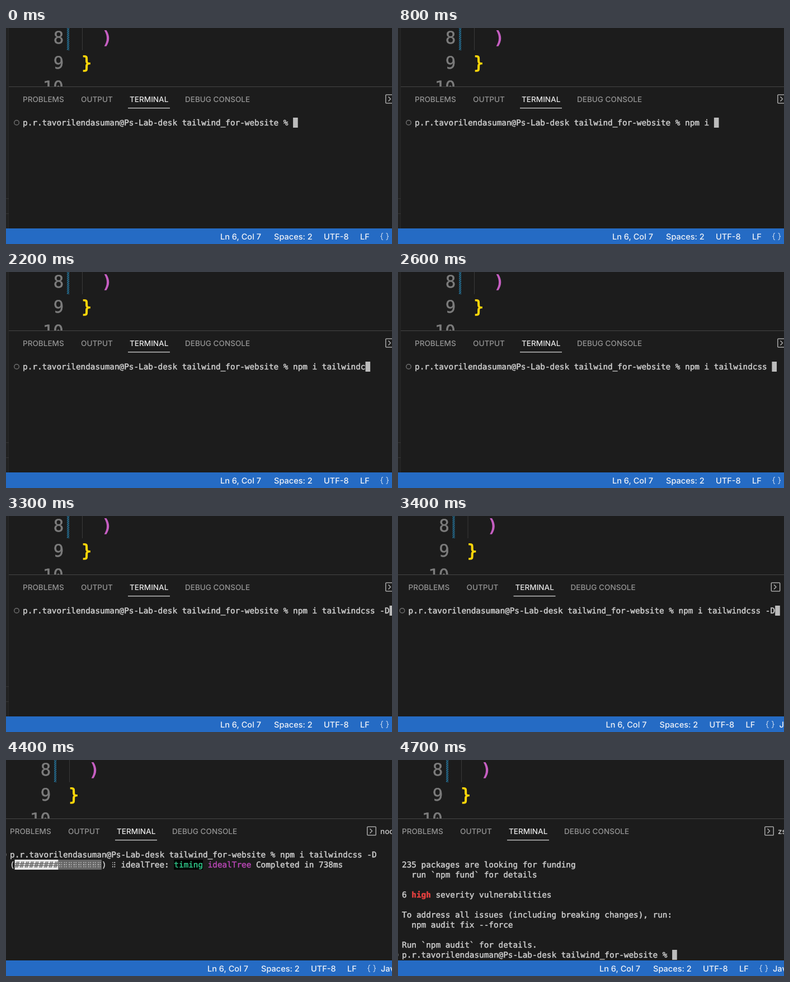
An HTML page for the animation above (5000 ms loop, 690 by 388 pixels).

```html
<!DOCTYPE html>
<html lang="en">
<head>
<meta charset="utf-8">
<title>Installing a package</title>
<style>
  html, body { margin: 0; width: 100%; height: 100%; overflow: hidden; background: #1c1c1c; }
  svg { display: block; width: 690px; height: 388px; }
  text { white-space: pre; text-rendering: geometricPrecision; }
  .code { font: 30.7px "DejaVu Sans Mono", monospace; }
  .num { fill: #7c7c7c; stroke: #7c7c7c; stroke-width: .5; text-anchor: end; }
  .bracket { stroke-width: 1.3; }
  .tab { font: 500 13.55px Inter, sans-serif; fill: #949494; }
  .bar { font: 500 14.55px Inter, sans-serif; fill: #f0f3f8; }
  .term { font: 14.33px "DejaVu Sans Mono", monospace; stroke-width: .5; }
  .bold { font-weight: bold; }
</style>
</head>
<body>
<svg viewBox="0 0 690 388">
  <defs>
    <pattern id="hatch" width="3.8" height="3.8" patternUnits="userSpaceOnUse">
      <path d="M-1 4.8L4.8 -1M-1 1L1 -1M2.8 4.8L4.8 2.8" stroke="#2688b8" stroke-width="1.4"/>
    </pattern>
  </defs>
  <rect width="690" height="388" fill="#1c1c1c"/>
  <g id="view">
    <g class="code">
      <text class="num" x="103.3" y="28">8</text>
      <text class="num" x="103.3" y="72.7">9</text>
      <text class="num" x="102.8" y="116.5">10</text>
      <text class="bracket" x="171.5" y="27.5" fill="#c65fc2" stroke="#c65fc2">)</text>
      <text class="bracket" x="135" y="72.5" fill="#ffd60a" stroke="#ffd60a">}</text>
    </g>
    <rect x="109" width="4" height="40" fill="url(#hatch)"/>
    <path d="M136.5 0V40" stroke="#393939"/>

    <rect x="5" y="105" width="740" height="256" fill="#1c1c1c"/>
    <path d="M5 105.5H745" stroke="#454545"/>
    <rect width="5" height="361" fill="#212121"/>
    <path d="M4.5 0V361" stroke="#282828"/>
    <path d="M0 306.5H5M0 333.5H5" stroke="#363636"/>

    <g class="tab">
      <text x="30" y="133">PROBLEMS</text>
      <text x="134" y="133">OUTPUT</text>
      <text x="221" y="133" fill="#e7e7e7">TERMINAL</text>
      <text x="320" y="133">DEBUG CONSOLE</text>
    </g>
    <path d="M218 143.8H293" stroke="#dcdcdc" stroke-width="1.2"/>
    <g id="shell">
      <path d="M2 .8H15Q16.2 .8 16.2 2V15Q16.2 16.2 15 16.2H2Q.8 16.2 .8 15V2Q.8 .8 2 .8ZM5.5 4.5L9.5 8.5L5.5 12.5"
        transform="translate(0 119)" fill="none" stroke="#bdbdbd" stroke-width="1.3"/>
      <text id="shellName" class="tab" x="24" y="132.5" style="fill:#cccccc"></text>
    </g>

    <g id="term"></g>

    <rect y="360" width="745" height="28" fill="#256bc4"/>
    <g class="bar">
      <text x="383" y="380">Ln 6, Col 7</text>
      <text x="479" y="380">Spaces: 2</text>
      <text x="568" y="380">UTF-8</text>
      <text x="633" y="380">LF</text>
      <text x="693" y="380">JavaScript</text>
    </g>
    <path d="M674 368.5Q671.5 368.5 671.5 371V372.5Q671.5 374.5 669.5 374.5Q671.5 374.5 671.5 376.5V378Q671.5 380.5 674 380.5M679.5 368.5Q682 368.5 682 371V372.5Q682 374.5 684 374.5Q682 374.5 682 376.5V378Q682 380.5 679.5 380.5"
      fill="none" stroke="#c8d9f0" stroke-width="1.1"/>
  </g>
</svg>
<script>
const LOOP = 5000, STEP = 100, PAN = 23;
const X0 = 30, CELL = 8.627, ROW = 18, TOP = 161;
const FG = "#cccccc", MAGENTA = "#b746b4", GREEN = "#2fc487";
const PROMPT = "p.r.tavorilendasuman@Ps-Lab-desk tailwind_for-website % ";
const COMMAND = "npm i tailwindcss -D";
const SPINNER = "⠋⠙⠹⠸⠼⠴⠦⠧⠇⠏";
// [time, characters typed so far]
const KEYS = [[100, 1], [200, 2], [300, 3], [400, 4], [500, 6], [1200, 7], [1400, 8],
  [1500, 9], [1600, 10], [1700, 12], [1800, 14], [2200, 15], [2300, 16], [2400, 17],
  [2600, 18], [3000, 19], [3100, 20]];
const SUBMIT = 3800, TIMING = 4400, DONE = 4700;

const $ = id => document.getElementById(id);
const colX = col => X0 + col * CELL;
const rowY = row => TOP + row * ROW;

function box(col, row, cells, fill) {
  return `<rect x="${colX(col)}" y="${rowY(row)}" width="${cells * CELL}" height="${ROW}" fill="${fill}"/>`;
}

function print(col, row, str, fill = FG, cls = "") {
  return `<text class="term ${cls}" x="${colX(col)}" y="${rowY(row) + 14}" fill="${fill}" stroke="${fill}">${str}</text>`;
}

// A braille cell shows raised dots strongly and the empty ones faintly.
function braille(col, row, ch) {
  const bits = ch.charCodeAt(0) & 63;
  let out = "";
  for (let i = 0; i < 6; i++) {
    const x = colX(col) + (i < 3 ? 2.6 : 6.1), y = rowY(row) + 5.2 + (i % 3) * 3.8;
    out += `<circle cx="${x}" cy="${y}" r="1" fill="#dddddd" opacity="${bits >> i & 1 ? 1 : .65}"/>`;
  }
  return out;
}

function promptLine(row, typed, cursor) {
  const line = PROMPT + typed;
  return `<circle cx="19" cy="${rowY(row) + 9}" r="4.3" fill="none" stroke="#6e6e6e" stroke-width="1.4"/>`
    + print(0, row, line) + (cursor ? box(line.length, row, 1, "#bcbcbc") : "");
}

function progress(done, t) {
  let out = print(0, 1, "(") + box(1, 1, 18, "#666666") + box(1, 1, done, "#e5e5e5")
    + print(1, 1, "#".repeat(done), "#666666") + print(19, 1, ")");
  for (let i = done; i < 18; i++) out += braille(1 + i, 1, "⠂");
  return out + braille(21, 1, SPINNER[t / STEP % SPINNER.length]);
}

function terminal(t) {
  if (t >= DONE) {
    return print(0, 1, "235 packages are looking for funding")
      + print(2, 2, "run `npm fund` for details")
      + print(0, 4, "6") + print(2, 4, "high", "#e5403f", "bold") + print(7, 4, "severity vulnerabilities")
      + print(0, 6, "To address all issues (including breaking changes), run:")
      + print(2, 7, "npm audit fix --force")
      + print(0, 9, "Run `npm audit` for details.")
      + promptLine(10, "", true);
  }
  if (t >= TIMING) {
    return promptLine(0, COMMAND, false) + progress(9, t) + print(23, 1, "idealTree:")
      + box(34, 1, 6, "#000000") + print(34, 1, "timing", GREEN)
      + print(41, 1, "idealTree", MAGENTA) + print(51, 1, "Completed in 738ms");
  }
  if (t >= SUBMIT) {
    return promptLine(0, COMMAND, false) + progress(0, t) + print(23, 1, "idealTree:tailwind_for-website:")
      + box(55, 1, 4, "#cccccc") + print(55, 1, "sill", "#1c1c1c")
      + print(60, 1, "idealTree", MAGENTA) + print(70, 1, "buildDeps");
  }
  let count = 0;
  for (const [at, n] of KEYS) if (t >= at) count = n;
  return promptLine(0, COMMAND.slice(0, count), true);
}

function draw(t) {
  const p = Math.min(1, Math.max(0, (t - 3300) / 200));
  const pan = PAN * p * p * (3 - 2 * p);
  const busy = t >= SUBMIT && t < DONE;
  $("view").setAttribute("transform", `translate(${-pan} 0)`);
  $("shell").setAttribute("transform", `translate(${busy ? 668 : 678} 0)`);
  $("shellName").textContent = busy ? "node" : "zsh";
  $("term").innerHTML = terminal(t);
}

const start = performance.now();
let shown = -1;
function tick() {
  const t = Math.floor((performance.now() - start) % LOOP / STEP) * STEP;
  if (t !== shown) draw(shown = t);
  requestAnimationFrame(tick);
}
tick();
</script>
</body>
</html>
```
